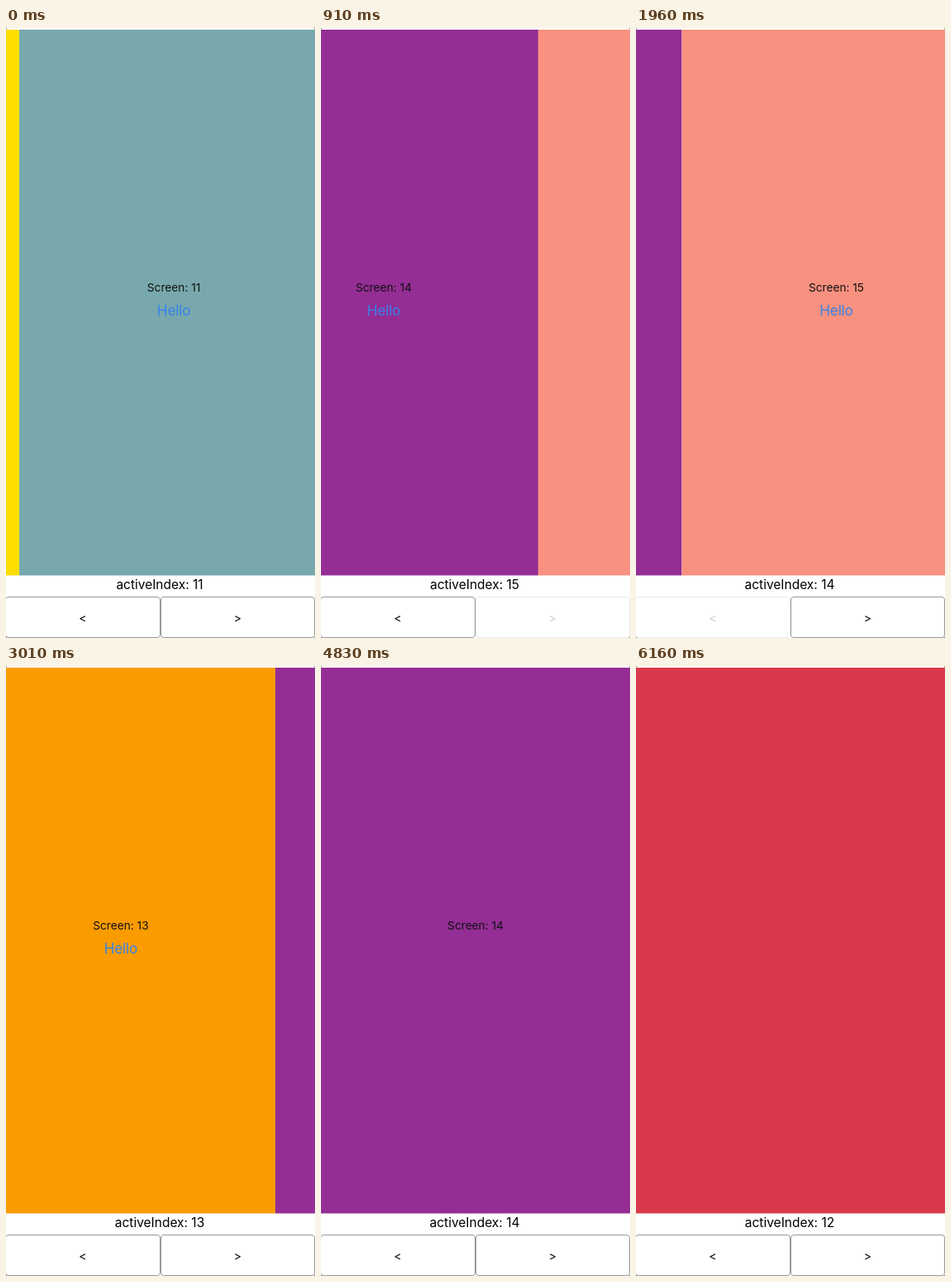
An HTML page that plays this animation: 374x736 px, repeating every 6.3 s.

```html
<!DOCTYPE html>
<html lang="en">
<head>
<meta charset="utf-8">
<title>Pager</title>
<style>
  html, body { margin: 0; width: 100%; height: 100%; overflow: hidden; background: #333; }
  #stage {
    position: relative; width: 374px; height: 736px; overflow: hidden;
    background: #fff; border-radius: 2px; color: #000;
    font-family: Inter, Roboto, sans-serif; text-align: center; white-space: nowrap;
  }
  #pager { position: absolute; left: 0; top: 2px; width: 374px; height: 659px; overflow: hidden; }
  #pager::after {
    content: ""; position: absolute; left: 0; bottom: 0; width: 100%; height: 1px;
    background: rgba(255, 255, 255, .5);
  }
  #strip { position: absolute; left: 0; top: 0; height: 100%; }
  .screen { position: absolute; top: 0; width: 374px; height: 100%; }
  .screen div { position: absolute; left: 0; width: 100%; line-height: 24px; }
  .title { top: 299px; font-size: 13.7px; color: #111; }
  .hello { top: 327px; font-size: 17.2px; letter-spacing: -.2px; color: #3483e8; }
  #label { position: absolute; top: 660px; left: 0; width: 372px; line-height: 24px; font-size: 15.5px; }
  .button {
    position: absolute; top: 686px; box-sizing: border-box; height: 50px;
    border: 1px solid #999; border-radius: 4px; line-height: 49px; font-size: 14px;
  }
  #back { left: -1px; width: 188px; }
  #next { left: 187px; width: 187px; }
</style>
</head>
<body>
<div id="stage">
  <div id="pager"><div id="strip"></div></div>
  <div id="label"></div>
  <div class="button" id="back">&lt;</div>
  <div class="button" id="next">&gt;</div>
</div>
<script>
const LOOP = 6300, STEP = 70, LAST = 6160, WIDTH = 374, FIRST = 10;
const colors = ['#fddd00', '#78a8ad', '#d93a4b', '#fa9b00', '#942d94', '#f99180', '#d8977a', '#9bfddd'];

// Start, end, target screen; taps come first, swipes follow.
const taps = [
  [-245, 35, 11], [120, 345, 12], [355, 650, 13], [655, 845, 14], [845, 1025, 15],
  [1025, 1205, 16], [1205, 1411, 17], [1440, 1655, 16], [1660, 1880, 15],
  [1892, 2172, 14], [2190, 2470, 13]
];
const swipes = [
  [2900, 3390, 14], [3640, 4090, 15], [4400, 4830, 14], [5110, 5540, 13], [5700, 6120, 12]
];
const moves = [...taps, ...swipes];

const $ = id => document.getElementById(id);
const clamp = x => Math.min(1, Math.max(0, x));
const smooth = x => x * x * (3 - 2 * x);

const screens = colors.map((color, i) => {
  const el = document.createElement('div');
  el.className = 'screen';
  el.style.left = i * WIDTH + 'px';
  el.style.background = color;
  el.innerHTML = `<div class="title">Screen: ${FIRST + i}</div><div class="hello">Hello</div>`;
  $('strip').append(el);
  return { title: el.children[0], hello: el.children[1] };
});

// A pressed button dims quickly, holds, then recovers.
function pressOpacity(age) {
  if (age < 0 || age > 195) return 1;
  return 1 - 0.8 * Math.min(clamp(age / 40), clamp((195 - age) / 55));
}

function show(el, visible) {
  el.style.visibility = visible ? 'visible' : 'hidden';
}

function draw(t) {
  let position = FIRST, active = FIRST, from = FIRST, back = 1, next = 1;
  moves.forEach(([start, end, to], i) => {
    const tap = i < taps.length;
    if (t >= start) position = from + (to - from) * smooth(clamp((t - start) / (end - start)));
    if (t >= (tap ? start : end - 40)) active = to;
    if (tap) {
      const opacity = pressOpacity(t - start);
      if (to > from) next = Math.min(next, opacity);
      else back = Math.min(back, opacity);
    }
    from = to;
  });

  $('strip').style.transform = `translateX(${(FIRST - position) * WIDTH}px)`;
  $('label').textContent = 'activeIndex: ' + active;
  $('back').style.opacity = back;
  $('next').style.opacity = next;

  // Screens revisited late have only part of their content.
  show(screens[4].hello, t < 4400);
  show(screens[2].title, t < 5600);
  show(screens[2].hello, t < 5600);
}

const begin = performance.now();
function tick() {
  const t = (performance.now() - begin) % LOOP;
  draw(Math.min(LAST, Math.floor(t / STEP) * STEP));
  requestAnimationFrame(tick);
}
tick();
</script>
</body>
</html>
```
